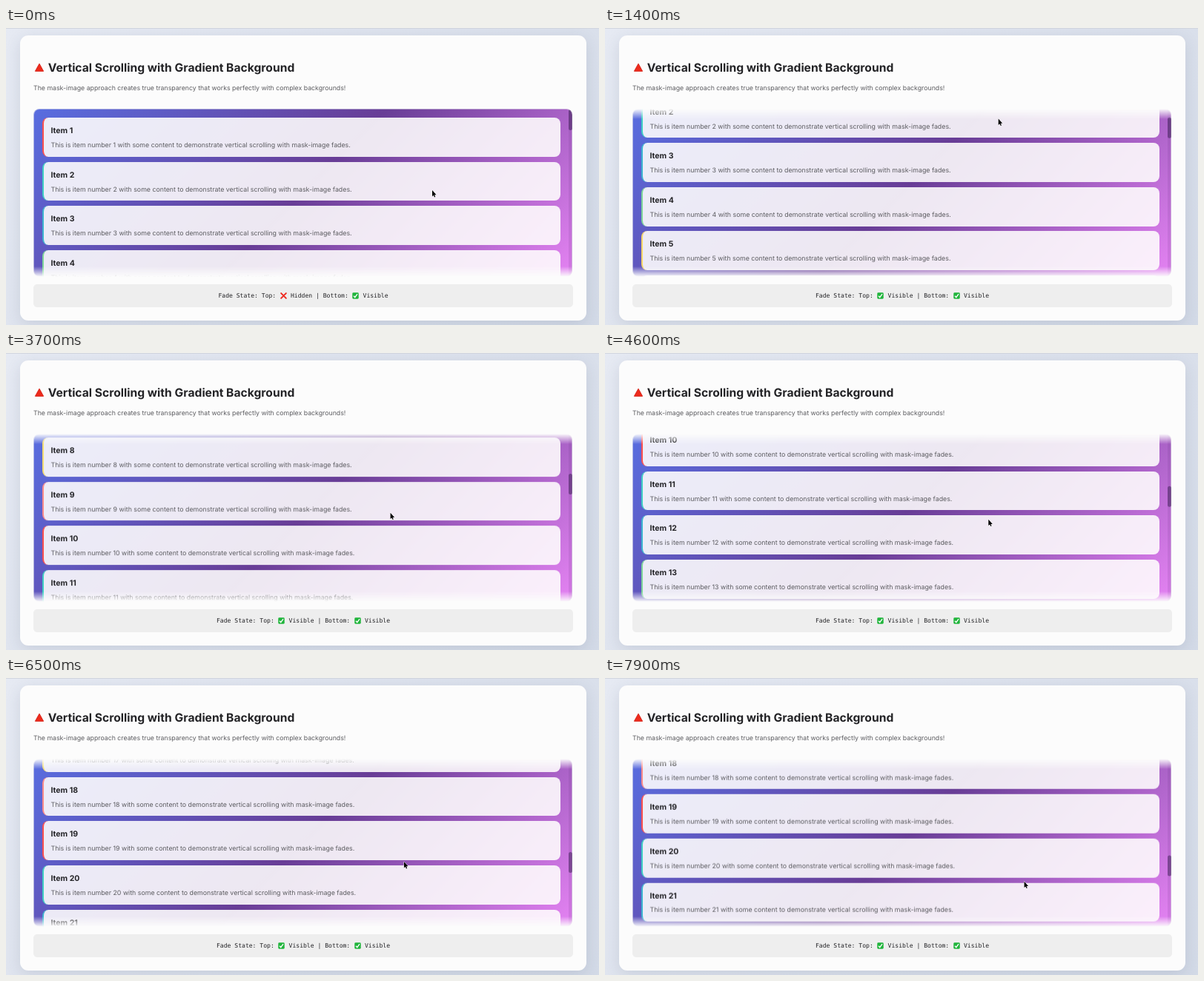
An HTML page for the animation above (8000 ms loop, 800 by 401 pixels).

```html
<!DOCTYPE html>
<html lang="en">
<head>
<meta charset="utf-8">
<title>Vertical scrolling with mask fades</title>
<style>
  html, body { margin: 0; width: 100%; height: 100%; overflow: hidden; }
  body {
    position: relative;
    background: linear-gradient(135deg, #e6eaf3, #d3dae7);
    font-family: Inter, "Open Sans", sans-serif;
    text-rendering: geometricPrecision;
    color: #232326;
  }
  body > *, .item, .item > *, #thumb, #track { position: absolute; box-sizing: border-box; white-space: pre; }
  .edge { left: 0; top: 0; width: 800px; height: 1px; background: #d2d6df; }
  .card {
    left: 18.5px; top: 9.5px; width: 764.5px; height: 385px;
    border-radius: 11px; background: #fcfcfc;
    box-shadow: 0 5px 20px rgba(50, 60, 90, .13);
  }
  h1 { left: 56.7px; top: 44px; margin: 0; font: 700 15.65px/20px Inter, sans-serif; }
  .lead { left: 37px; top: 76px; font-size: 8.76px; line-height: 13px; color: #5c5c60; }
  #view {
    left: 37px; top: 108.5px; width: 727px; height: 227px;
    overflow: hidden; border-radius: 8px;
    background: linear-gradient(135deg, #586de0, #683d96 50%, #e583f3);
    box-shadow: inset 0 0 0 1px rgba(225, 225, 235, .6);
  }
  #list { position: absolute; left: 0; top: 0; will-change: transform; }
  .item {
    left: 12.3px; width: 698.7px; height: 52.6px;
    border-left: 2.6px solid; border-radius: 8px;
    background: rgba(254, 253, 253, .89);
  }
  .item b { left: 9.2px; top: 10px; font-weight: 700; font-size: 10.5px; line-height: 15px; color: #232326; }
  .item span { left: 9.2px; top: 30.8px; font-size: 8.81px; line-height: 13px; color: #5c5c60; }
  #track { right: 0; top: 0; width: 5px; height: 100%; background: rgba(60, 20, 90, .1); }
  #thumb { right: 0; top: 0; width: 5px; height: 28px; border-radius: 2.5px; background: rgba(50, 25, 75, .48); }
  .status {
    left: 37px; top: 346px; width: 728px; height: 30.6px; border-radius: 5px;
    background: #eee; text-align: center;
    font: 8.09px/30px "DejaVu Sans Mono", monospace;
  }
  .status svg { width: 9px; height: 9px; margin: 0 .5px; vertical-align: -1.8px; }
</style>
</head>
<body>
<div class="edge"></div>
<div class="card"></div>
<svg style="left:38px;top:47px" width="14" height="13">
  <path d="M7 1.2 12.6 11.3H1.4Z" fill="#ee2b1c" stroke="#d8251b" stroke-linejoin="round"/>
</svg>
<h1>Vertical Scrolling with Gradient Background</h1>
<div class="lead">The mask-image approach creates true transparency that works perfectly with complex backgrounds!</div>
<div id="view"><div id="list"></div><div id="track"></div><div id="thumb"></div></div>
<div class="status">Fade State: Top: <span id="top"></span> | Bottom: <span id="bottom"></span></div>
<svg id="cursor" style="left:0;top:0" width="9" height="13" viewBox="-1 -1 9 13">
  <path d="M0 0V8.4L1.8 6.7 3 9.4 4.2 8.9 3.1 6.2H5.5Z" fill="#000" stroke="#fff" stroke-width=".8" paint-order="stroke"/>
</svg>
<script>
const LOOP = 8000, STEP = 100, COUNT = 30, PITCH = 59.57, MAX = 1584, FADE = 14;
const $ = id => document.getElementById(id);
const colors = ['#ff4f4f', '#3fcfc4', '#3db5d0', '#7fd69a', '#f6d768', '#f79bf0', '#5cf06a', '#f3dc72', '#ff8a8a'];

for (let i = 0; i < COUNT; i++) {
  const n = i + 1;
  $('list').insertAdjacentHTML('beforeend',
    `<div class="item" style="top:${12.2 + i * PITCH}px;border-color:${colors[i % colors.length]}"><b>Item ${n}</b><span>This is item number ${n} with some content to demonstrate vertical scrolling with mask-image fades.</span></div>`);
}

// [time, scroll offset]
const scrollKeys = [[0, 0], [600, 0], [900, 15], [1400, 85], [2600, 261.3], [4600, 557], [6000, 793.5], [6300, 855],
  [6500, 1000], [6800, 1390], [7000, 1555], [7100, MAX], [7300, MAX], [7400, 1560], [7600, 1370], [7900, 1036.3], [8000, 940]];
// [time, x, y]
const cursorKeys = [[0, 575, 219], [1400, 530.7, 122.5], [2600, 520.3, 203.5], [4600, 517.3, 224.7],
  [6000, 522.3, 233], [7300, 566.7, 278.5], [8000, 565.5, 274.5]];

function sample(keys, t, ease = u => u) {
  const i = Math.max(1, keys.findIndex(k => k[0] >= t));
  const a = keys[i - 1], b = keys[i];
  const u = ease((t - a[0]) / (b[0] - a[0]));
  return a.slice(1).map((v, j) => v + (b[j + 1] - v) * u);
}
const smooth = u => u * u * (3 - 2 * u);

const tick = '<rect x=".3" y=".3" width="9.4" height="9.4" rx="1.6" fill="#21b53c"/><path d="M2.3 5.3 4.2 7.5 7.8 2.4" fill="none" stroke="#fff" stroke-width="1.5"/>';
const cross = '<path d="M1.3 1.3 8.7 8.7M8.7 1.3 1.3 8.7" stroke="#ee2a20" stroke-width="2.2" stroke-linecap="round"/>';
const state = on => `<svg viewBox="0 0 10 10">${on ? tick : cross}</svg> ${on ? 'Visible' : 'Hidden'}`;

let shown = '';
function setFades(top, bottom) {
  const key = `${top} ${bottom}`;
  if (key === shown) return;
  shown = key;
  $('top').innerHTML = state(top);
  $('bottom').innerHTML = state(bottom);
  const mask = `linear-gradient(${top ? 'transparent' : '#000'}, #000 ${FADE}px, #000 calc(100% - ${FADE}px), ${bottom ? 'transparent' : '#000'})`;
  $('view').style.webkitMaskImage = $('view').style.maskImage = mask;
}

function draw() {
  // The picture advances in steps; the small lead absorbs timer rounding.
  const t = Math.floor((performance.now() + 5) / STEP) * STEP % LOOP;
  const [scroll] = sample(scrollKeys, t);
  const [x, y] = sample(cursorKeys, t, smooth);
  $('list').style.transform = `translateY(${-scroll}px)`;
  $('thumb').style.transform = `translateY(${1 + scroll / MAX * 198}px)`;
  $('cursor').style.transform = `translate(${x - 1}px, ${y - 1}px)`;
  setFades(scroll > 1, scroll < MAX - 1);
  requestAnimationFrame(draw);
}
draw();
</script>
</body>
</html>
```
